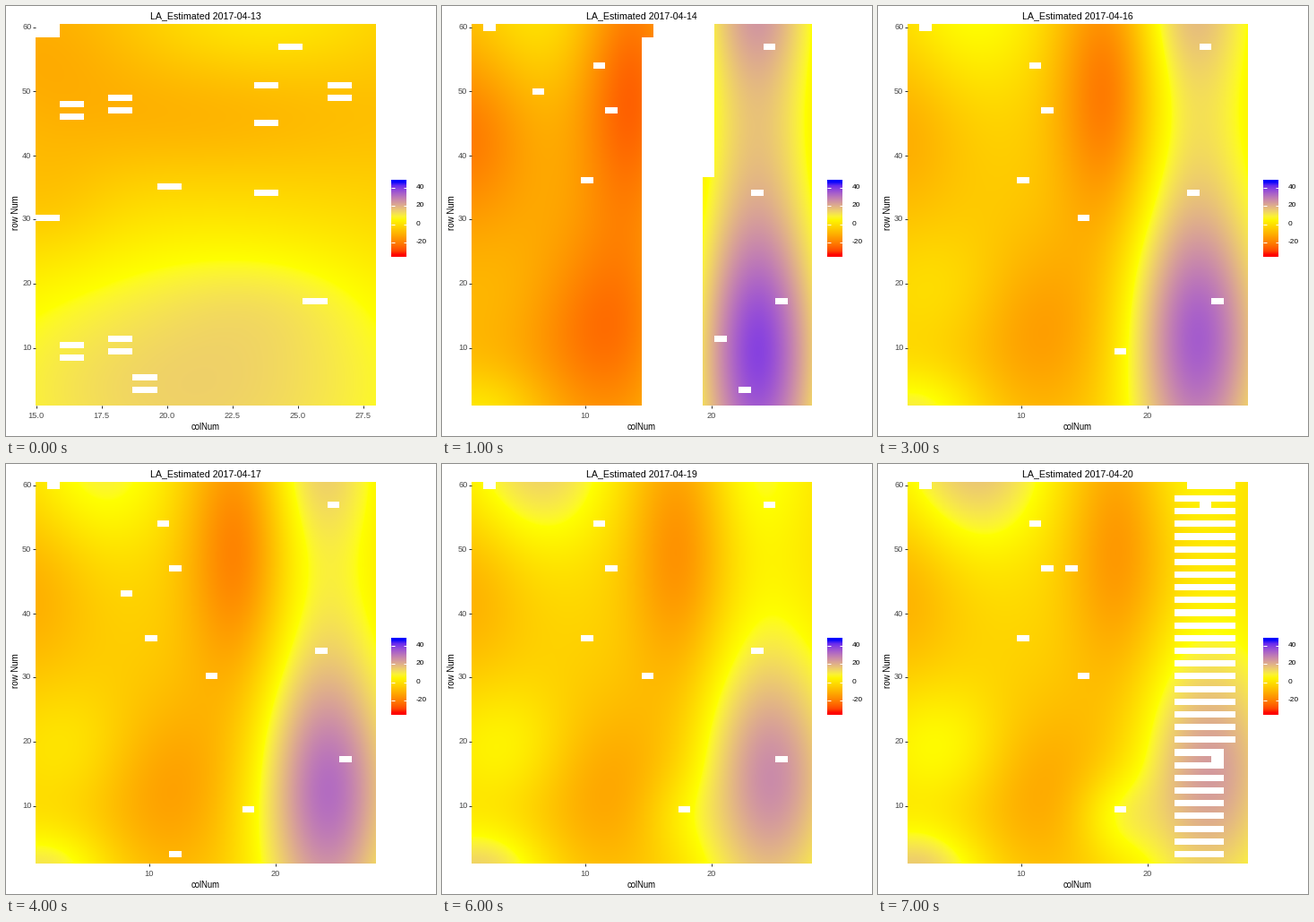
Animation, 480 px wide and 480 px high, one loop 8000 ms. Source, as a matplotlib script:

```python
import numpy as np
import matplotlib
import matplotlib.pyplot as plt
from matplotlib.animation import FuncAnimation

matplotlib.rcParams["font.family"] = "Liberation Sans"

SIZE, DPI = 480, 72
LEFT, RIGHT, TOP, BOTTOM = 33, 413, 20, 446
W, H = RIGHT - LEFT, BOTTOM - TOP
LOW, HIGH = -36.0, 47.8
LAST_COL, ROWS, DAYS = 28, 60, 8


# --- colour scale: red, yellow, blue blended in Lab ---
def lab_to_rgb(lab):
    L, a, b = np.moveaxis(lab, -1, 0)
    fy = (L + 16) / 116
    f = np.stack([fy + a / 500, fy, fy - b / 200], -1)
    xyz = np.where(f > 6 / 29, f ** 3, (f - 4 / 29) * 3 * (6 / 29) ** 2)
    xyz = xyz * [0.9505, 1.0, 1.0888]
    to_rgb = np.array([[3.2406, -1.5372, -0.4986],
                       [-0.9689, 1.8758, 0.0415],
                       [0.0557, -0.2040, 1.0570]])
    lin = np.clip(xyz @ to_rgb.T, 0, 1)
    return np.where(lin > 0.0031308, 1.055 * lin ** (1 / 2.4) - 0.055, 12.92 * lin)


LAB = np.array([[53.2, 80.1, 67.2], [97.1, -21.6, 94.5], [32.3, 79.2, -107.9]])


def colour(value):
    t = np.clip((value - LOW) / (HIGH - LOW), 0, 1) * 2
    lab = np.stack([np.interp(t, [0, 1, 2], LAB[:, i]) for i in range(3)], -1)
    return lab_to_rgb(lab)


# --- the surface: a level plus soft hills and hollows ---
def first_col(day):
    return 15 if day == 0 else 1


def grid(first):
    cols = first - 0.5 + (np.arange(W) + 0.5) / W * (LAST_COL - first + 1)
    rows = ROWS + 0.5 - (np.arange(H) + 0.5) / H * ROWS
    return np.meshgrid(cols, rows)


def surface(day):
    x, y = grid(first_col(day))

    def hill(height, cx, cy, wx, wy):
        return height * np.exp(-((x - cx) / wx) ** 2 / 2 - ((y - cy) / wy) ** 2 / 2)

    if day == 0:
        return (-9 + hill(23, 21, 3, 9, 20)
                + hill(3, 24, 17, 3, 6)
                + hill(10, 24, 63, 4, 8)
                + hill(-5, 21, 46, 5, 7)
                + hill(-4, 15, 57, 2.5, 8)
                + hill(-4, 15, 32, 2, 7))

    t = day - 1
    early = np.exp(-3 * t)
    late = (t / 6) ** 4
    level = -6 + 0.5 * t - 5 * early
    # right side: a fading ridge with a strong peak drifting up and right
    ridge = hill(22 - 3.3 * t + 4 * early, 24, 30, 4, 1e3)
    peak = hill(25, 24 + 0.25 * t, 9 + t, 4, 14)
    top_right = hill(10 - 0.8 * t, 24, 63, 3, 8)
    # hollows
    column = hill(-24 + 1.5 * t + 6 * early, 16.6 + 0.2 * t - 3 * early, 50, 3, 16)
    belt = hill(-11 - 3 * early, 11.5, 12, 4.5, 11)
    left = hill(-7 - 0.3 * t - 5 * early, 0, 43, 3.5, 10)
    # slowly rising corners and spots
    top_left = hill(7 + 2.2 * t + 4 * early, 6, 64, 4.5, 10)
    corner = hill(12 + 1.2 * t, 1, -1, 4, 5)
    spot = hill(2 + 1.3 * t, 3.5, 19, 4, 7)
    late_spot = hill(10 * late, 17.5, 8, 2.5, 5)
    return (level + ridge + peak + top_right + column + belt + left
            + top_left + corner + spot + late_spot)


# --- empty cells as (col, row) ---
def block(cols, rows):
    return [(c, r) for c in cols for r in rows]


CORE = [(2, 60), (11, 54), (12, 47), (10, 36), (25, 57), (24, 34), (26, 17)]
LATE = CORE + [(15, 30), (18, 9)]


def empty_cells(day):
    if day == 0:
        pairs = [(15, 59), (16, 46), (18, 47), (27, 49), (16, 8), (18, 9), (19, 3)]
        upper = [(c, r + (1 if r == 59 else 2)) for c, r in pairs]
        return pairs + upper + block([24], [34, 45, 51]) + [
            (20, 35), (25, 57), (15, 30), (26, 17)]
    if day == 1:
        return (CORE + [(6, 50), (21, 11), (23, 3)] + block([15], range(1, 59))
                + block(range(16, 20), range(1, 61)) + block([20], range(37, 61)))
    if day == 2:
        return LATE + [(13, 32), (13, 30), (11, 4), (28, 3), (28, 1)]
    if day == 4:
        return LATE + [(8, 43), (12, 2)]
    if day == 7:
        return (LATE + [(14, 47)] + block(range(23, 27), range(2, 59, 2))
                + block([27], range(20, 59, 2)) + block(range(24, 28), [60]))
    return LATE


def paint(day):
    first = first_col(day)
    n = LAST_COL - first + 1
    empty = np.zeros((ROWS, n), bool)
    for c, r in empty_cells(day):
        empty[ROWS - r, c - first] = True
    rows = np.clip((np.arange(H) - 0.2) / 7.09, 0, ROWS - 1).astype(int)
    cols = np.clip((np.arange(W) + 0.6) * n / W, 0, n - 1).astype(int)
    image = colour(surface(day))
    image[empty[np.ix_(rows, cols)]] = 1
    return image


panels = [paint(day) for day in range(DAYS)]

# --- stage ---
fig = plt.figure(figsize=(SIZE / DPI, SIZE / DPI), dpi=DPI, facecolor="white")
ax = fig.add_axes([0, 0, 1, 1])
ax.axis("off")


def show(image, box, smooth="nearest"):
    return ax.imshow(image, extent=box, interpolation=smooth, aspect="auto")


def line(x0, y0, x1, y1, color="#333333"):
    return ax.plot([x0, x1], [y0, y1], color=color, lw=1, solid_capstyle="butt")[0]


def label(x, y, s, size=9.3, color="#4d4d4d", ha="center", **kw):
    return ax.text(x, y, s, fontsize=size, color=color, ha=ha, va="center", **kw)


def x_axis(values, first, form):
    parts = []
    for v in values:
        x = int(LEFT + (v - first) / (LAST_COL - first) * W) + 0.5
        parts += [line(x, BOTTOM, x, BOTTOM + 3), label(x, 457, form.format(v))]
    return parts


panel = show(panels[0], (LEFT, RIGHT, BOTTOM, TOP))
title = label(222.5, 11, "", 10.6, "black")
label(223, 470, "colNum", 9.5, "black")
label(11.5, 231, "row Num", 9.8, "black", rotation=90)

for r in range(10, 61, 10):
    y = int(452.6 - 7.16 * r) + 0.5
    line(LEFT - 3, y, LEFT, y)
    label(28.5, y + 0.5, str(r), ha="right")

narrow = x_axis(np.arange(15, 28, 2.5), 15, "{:.1f}")
wide = x_axis([10, 20], 1, "{}")

# legend bar, blended from twenty steps
bar = colour(np.linspace(HIGH, LOW, 20))[:, None]
show(bar, (430, 447, 280, 194), "bilinear")
for v in (40, 20, 0, -20):
    y = int(243 - v * 1.025) + 0.5
    line(430, y, 433.5, y, "white")
    line(443.5, y, 447, y, "white")
    label(458, y, str(v), 8.2, "black", ha="left")

ax.set_xlim(0, SIZE)
ax.set_ylim(SIZE, 0)


def draw(day):
    panel.set_data(panels[day])
    title.set_text(f"LA_Estimated 2017-04-{13 + day}")
    for part in narrow:
        part.set_visible(day == 0)
    for part in wide:
        part.set_visible(day > 0)
    return [panel, title, *narrow, *wide]


anim = FuncAnimation(fig, draw, frames=DAYS, interval=1000,
                     repeat=True, repeat_delay=0)
plt.show()
```
